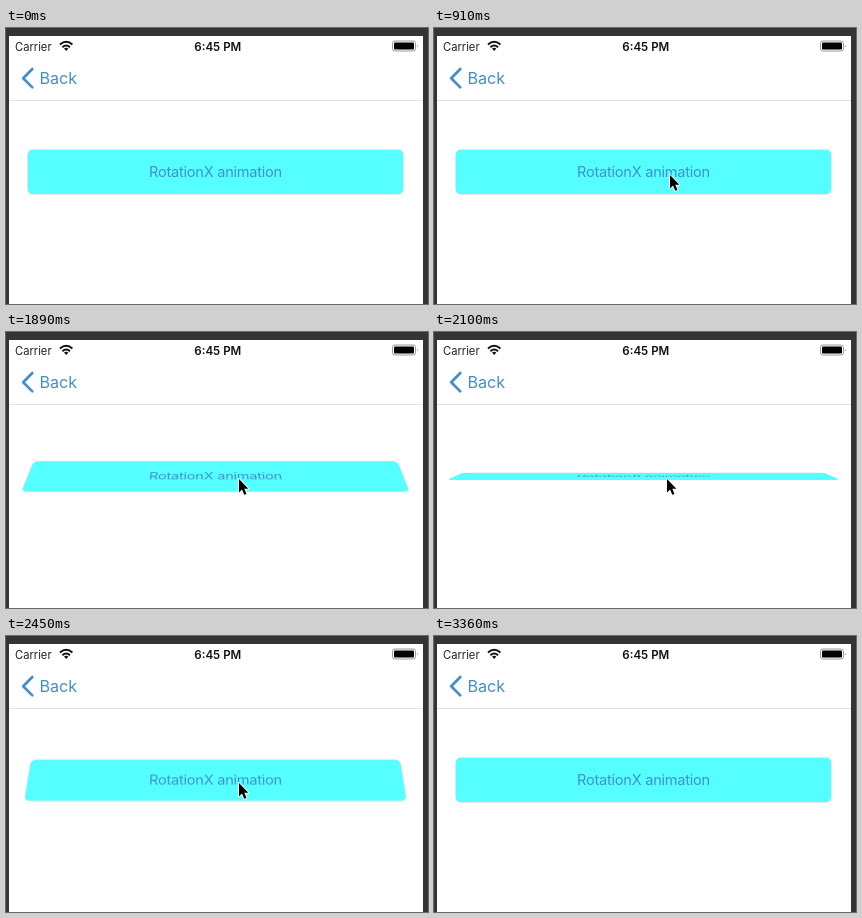
An HTML page for the animation above (3.43 s loop, 422 by 276 pixels).

```html
<!DOCTYPE html>
<html lang="en">
<head>
<meta charset="utf-8">
<title>RotationX animation</title>
<style>
  html, body { margin: 0; width: 100%; height: 100%; overflow: hidden; background: #fff; }
  body { position: relative; font-family: Inter, Roboto, "Liberation Sans", sans-serif; }
  svg { position: absolute; left: 0; top: 0; display: block; }
  .button {
    position: absolute; left: 22px; top: 122px; width: 375px; height: 44px;
    border-radius: 5px; background: #55ffff; color: #3c93cf;
    box-shadow: 0 0 2px rgba(70, 90, 110, .55);
    font-size: 14.6px; letter-spacing: -.25px; line-height: 45px; text-align: center;
    white-space: nowrap;
  }
</style>
</head>
<body>
<svg width="422" height="276" viewBox="0 0 422 276">
  <rect width="422" height="276" fill="#353535"/>
  <rect x="3" y="8" width="414" height="268" fill="#fff"/>
  <rect x="3" y="72" width="414" height="1" fill="#e2e2e2"/>

  <text x="9" y="22.5" font-size="11.2" fill="#222">Carrier</text>
  <g fill="none" stroke="#111" stroke-width="2">
    <path d="M54 16.6 Q60.2 11 66.4 16.6"/>
    <path d="M56.4 19.2 Q60.2 15.9 64 19.2"/>
  </g>
  <path d="M58 20.6 Q60.2 18.8 62.4 20.6 L60.2 23 Z" fill="#111"/>
  <text x="211.8" y="22.5" font-size="11.6" font-weight="600" fill="#111" text-anchor="middle">6:45 PM</text>
  <rect x="386.5" y="13" width="23" height="10" rx="2.6" fill="#fff" stroke="#999"/>
  <rect x="388" y="14.5" width="20" height="7" rx="1.3" fill="#000"/>
  <path d="M411 16.2 Q412.6 18 411 19.8 Z" fill="#999"/>

  <path d="M26.3 41 L17.2 50.2 L26.3 59.4" fill="none" stroke="#4490c6" stroke-width="2.7"
        stroke-linecap="round" stroke-linejoin="round"/>
  <text x="33.5" y="56" font-size="16.2" letter-spacing="-.1" fill="#4490c6">Back</text>
</svg>

<div class="button" id="button">RotationX animation</div>

<svg width="422" height="276" viewBox="0 0 422 276">
  <path id="cursor" d="M0 0 V13.4 L3 10.6 L5.3 15.8 L7.5 14.9 L5.3 9.8 H9.4 Z"
        fill="#000" stroke="#fff" stroke-width="1.8" stroke-linejoin="round" paint-order="stroke"/>
</svg>

<script>
  const LOOP = 3430, STEP = 70;
  const PEAK = 2060, SWING = 875;
  const button = document.getElementById('button');
  const cursor = document.getElementById('cursor');

  const clamp = v => Math.min(1, Math.max(0, v));
  const mix = (a, b, k) => a + (b - a) * k;

  // Tilts back ever faster to edge-on, then swings upright and settles.
  function tilt(t) {
    const near = clamp(1 - Math.abs(t - PEAK) / SWING);
    return 90 * Math.pow(near, t < PEAK ? 3 : 2.3);
  }

  function pointer(t) {
    if (t < 420 || t >= 3360) return null;
    if (t < 980) {
      const k = 1 - Math.pow(1 - clamp((t - 420) / 490), 2);
      return [mix(217, 236, k), mix(240, 147, k)];
    }
    if (t < 2800) return [t < 1050 ? 234.5 : 233, 147];
    const k = Math.pow(clamp((t - 2800) / 560), 1.7);
    return [mix(233, 230, k), mix(147, 279, k)];
  }

  function draw(t) {
    const angle = tilt(t);
    button.style.transform = angle > .2 ? `perspective(500px) rotateX(${angle}deg)` : 'none';
    const p = pointer(t);
    cursor.style.display = p ? '' : 'none';
    if (p) cursor.setAttribute('transform', `translate(${p[0]} ${p[1]})`);
  }

  const start = performance.now();
  function tick() {
    const t = (performance.now() - start) % LOOP;
    draw(Math.floor(t / STEP) * STEP);
    requestAnimationFrame(tick);
  }
  draw(0);
  requestAnimationFrame(tick);
</script>
</body>
</html>
```
